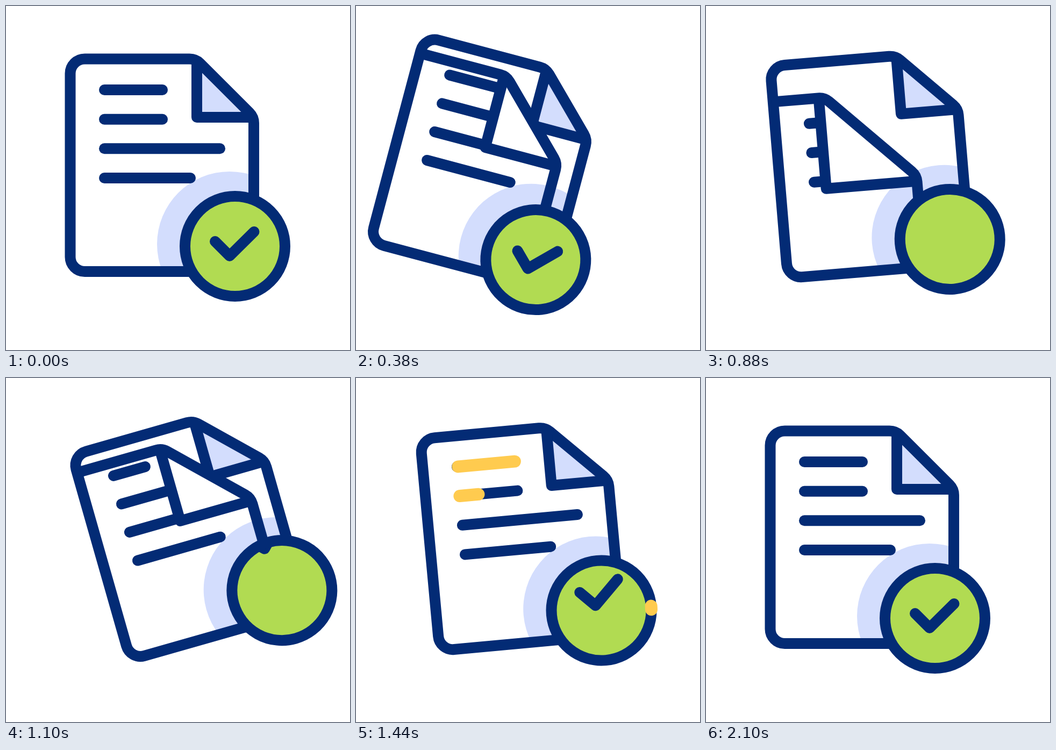
Recreate the animation shown at these times as an HTML page with a canvas. Size 640 px wide and 640 px high, loop 2.4 s.

```html
<!DOCTYPE html>
<html lang="en">
<head>
<meta charset="utf-8">
<title>Document check</title>
<style>
html, body { margin: 0; width: 100%; height: 100%; overflow: hidden; background: #fff; }
canvas { display: block; width: 640px; height: 640px; }
</style>
</head>
<body>
<canvas id="stage" width="640" height="640"></canvas>
<script>
const ctx = document.getElementById('stage').getContext('2d');
const LOOP = 2400;
const NAVY = '#032b75', PALE = [211, 221, 253], LIME = '#b1db52', GOLD = '#ffcb4f';
const PIVOT = { x: 284, y: 108.3 };
const PAGE = { left: 119.5, bottom: 494, corner: 27 };
const BADGE = { x: 426, y: 447, r: 93 };
const ROWS = [
  { y: 156, end: 291, glow: 1306 },
  { y: 210.7, end: 291, glow: 1393 },
  { y: 265.2, end: 398, glow: 1500 },
  { y: 320, end: 343, glow: 1606 }
];
const ROW_X = 183, GLOW_TIME = 124;

const clamp = v => Math.max(0, Math.min(1, v));
const part = (t, a, b) => clamp((t - a) / (b - a));
const sine = (t, a, b) => (1 - Math.cos(Math.PI * part(t, a, b))) / 2;
const rgb = c => `rgb(${c.map(Math.round).join(',')})`;

// cubic-bezier(.33, 0, .33, 1)
function soft(t, a, b) {
  const x = part(t, a, b);
  let lo = 0, hi = 1;
  for (let i = 0; i < 24; i++) {
    const s = (lo + hi) / 2;
    if (0.99 * s * (1 - s) + s * s * s < x) lo = s; else hi = s;
  }
  return lo * lo * (3 - 2 * lo);
}

function tilt(t) {
  const peak = 16.2;
  if (t < 500) return peak * soft(t, 100, 500);
  if (t < 1140) return peak * (1 - 2 * sine(t, 500, 1140));
  return -peak * (1 - soft(t, 1140, 1780));
}

const peel = t => sine(t, 100, 710) - sine(t, 740, 1420);

function checkShift(t) {
  if (t < 800) return 0.00095 * Math.max(0, t - 340) ** 2;
  return -((0.014 * Math.max(0, 1820 - t)) ** 2);
}

const firstRow = t => t < 800 ? 1 - sine(t, 390, 620) : sine(t, 900, 1270);

// Flap edges (l, t, r, b) and the 45-degree slope from (sx, t) to (r, sy)
function fold(q) {
  const l = 355 - 167.5 * q, t = 98.5 + 74 * q, r = 461 - 97 * q, b = 207 + 141.5 * q;
  const sx = l - 2 + 14 * q;
  return { l, t, r, b, sx, sy: t + r - sx };
}

function stroke(color, width) {
  ctx.strokeStyle = color;
  ctx.lineWidth = width;
  ctx.stroke();
}

function trace(points) {
  ctx.beginPath();
  points.forEach(([x, y]) => ctx.lineTo(x, y));
}

function polyline(points, color, width) {
  trace(points);
  stroke(color, width);
}

function flap(f, color) {
  trace([[f.l, f.t], [f.sx, f.t], [f.r, f.sy], [f.r, f.b], [f.l, f.b]]);
  ctx.fillStyle = color;
  ctx.fill();
}

function disc(x, y, r, color) {
  ctx.beginPath();
  ctx.arc(x, y, r, 0, 2 * Math.PI);
  ctx.fillStyle = color;
  ctx.fill();
}

function slopedEdge(f) {
  ctx.arcTo(f.sx, f.t, f.r, f.sy, 28);
  ctx.arcTo(f.r, f.sy, f.r, 480, 28);
}

function foldLines(f) {
  polyline([[f.l, f.t + 4], [f.l, f.b], [f.r - 6, f.b]], NAVY, 20);
}

function pagePath(f) {
  const { left, bottom, corner } = PAGE;
  ctx.beginPath();
  ctx.moveTo(left, 300);
  ctx.arcTo(left, f.t, 200, f.t, corner);
  slopedEdge(f);
  ctx.arcTo(f.r, bottom, 300, bottom, corner);
  ctx.arcTo(left, bottom, left, 300, corner);
  ctx.closePath();
}

function backSheet() {
  const f = fold(0);
  pagePath(f);
  ctx.fillStyle = '#fff';
  ctx.fill();
  ctx.save();
  ctx.clip();
  disc(416, 443, 135, rgb(PALE));
  ctx.restore();
  flap(f, rgb(PALE));
  pagePath(f);
  stroke(NAVY, 20);
  foldLines(f);
}

function rows(t, f) {
  ctx.save();
  trace([[100, f.t], [f.sx, f.t], [f.r, f.sy], [f.r, 500], [100, 500]]);
  ctx.clip();
  ROWS.forEach((row, i) => {
    const span = row.end - ROW_X;
    const shown = i ? 1 : firstRow(t);
    if (shown > 0) polyline([[ROW_X, row.y], [ROW_X + span * shown, row.y]], NAVY, 20);
    const mid = row.glow + GLOW_TIME;
    const head = sine(t, row.glow, mid), tail = sine(t, mid, mid + GLOW_TIME);
    if (head > 0 && tail < 1)
      polyline([[ROW_X + span * tail, row.y], [ROW_X + span * head, row.y]], GOLD, 23);
  });
  ctx.restore();
}

function frontSheet(t) {
  const q = peel(t), f = fold(q);
  rows(t, f);
  if (q < 0.0002) return;
  const fade = clamp(q * 12);
  flap(f, rgb(PALE.map(c => c + (255 - c) * fade)));
  ctx.beginPath();
  ctx.moveTo(126, f.t);
  slopedEdge(f);
  ctx.lineTo(f.r, 440);
  stroke(NAVY, 20);
  foldLines(f);
}

function badge(t) {
  const { x, y, r } = BADGE;
  disc(x, y, r, LIME);
  ctx.save();
  ctx.beginPath();
  ctx.arc(x, y, r - 9, 0, 2 * Math.PI);
  ctx.clip();
  const dy = checkShift(t);
  polyline([[389, 438 + dy], [416, 465 + dy], [461.5, 420 + dy]], NAVY, 20);
  ctx.restore();
  ctx.beginPath();
  ctx.arc(x, y, r, 0, 2 * Math.PI);
  stroke(NAVY, 20);
  const head = sine(t, 1394, 2081), tail = sine(t, 1576, 2095);
  if (head > 0.002 && tail < 1) {
    ctx.beginPath();
    ctx.arc(x, y, r, tail * 2 * Math.PI, head * 2 * Math.PI);
    stroke(GOLD, 23);
  }
}

function draw(t) {
  ctx.setTransform(1, 0, 0, 1, 0, 0);
  ctx.fillStyle = '#fff';
  ctx.fillRect(0, 0, 640, 640);
  ctx.lineCap = ctx.lineJoin = 'round';
  ctx.translate(PIVOT.x, PIVOT.y);
  ctx.rotate(tilt(t) * Math.PI / 180);
  ctx.translate(-PIVOT.x, -PIVOT.y);
  backSheet();
  frontSheet(t);
  badge(t);
}

const start = performance.now();
function tick() {
  draw((performance.now() - start) % LOOP);
  requestAnimationFrame(tick);
}
tick();
</script>
</body>
</html>
```
